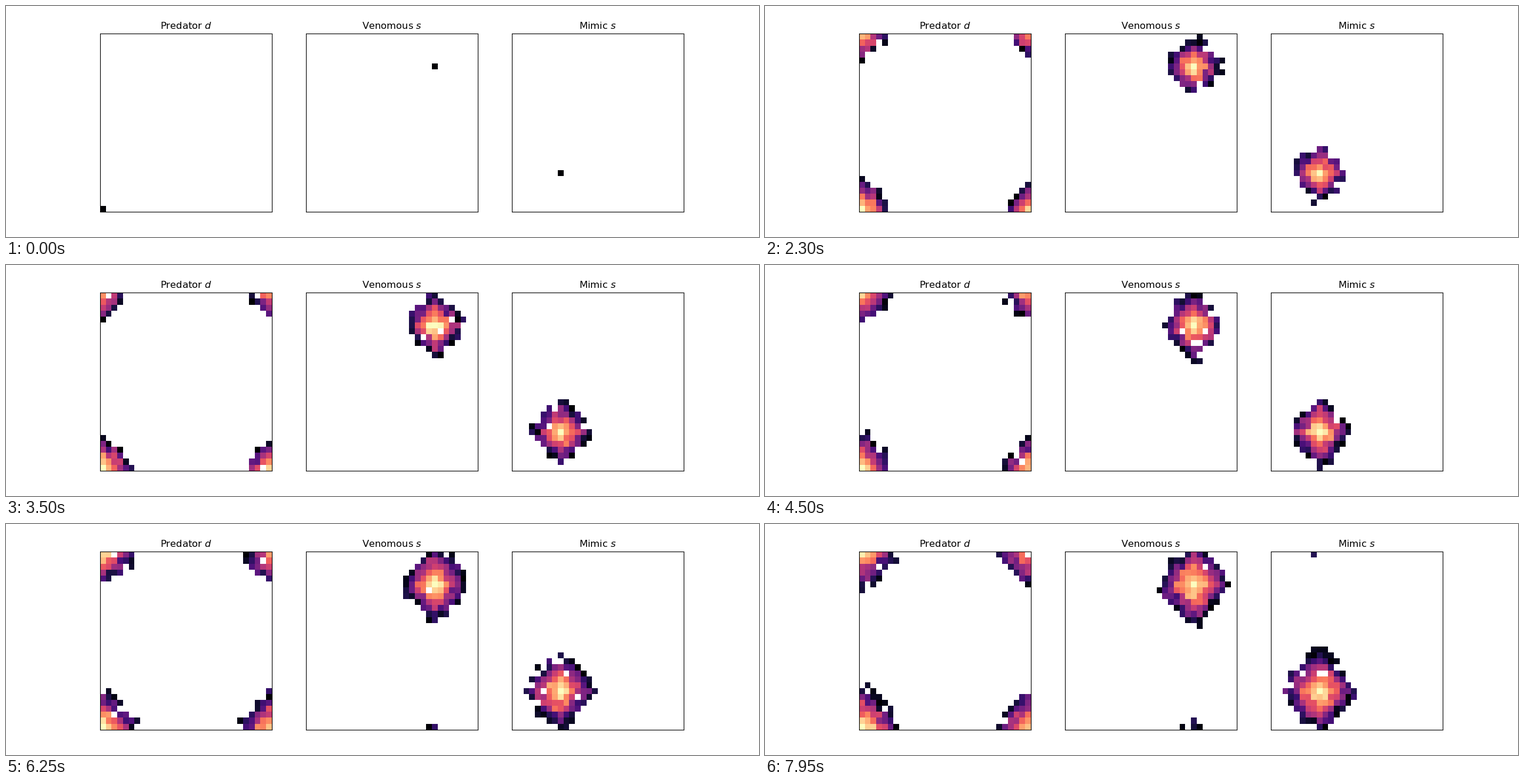
A matplotlib script that plays this animation: 1280 by 394 pixels, repeating every 8000 ms.

```python
import numpy as np
import matplotlib.pyplot as plt
from matplotlib.animation import FuncAnimation

SIZE = 30
FRAMES = 160
INTERVAL = 50
RISE = 5.0
SCALE = 1280 / 1300  # a 13 x 4 inch layout shrunk to the stage

TITLES = ["Predator $d$", "Venomous $s$", "Mimic $s$"]
CENTRES = [(0, 0), (22, 24), (8, 6)]


def make_noise(rng, keep=0.6):
    """Noise per cell that fades gradually from one step to the next."""
    noise = rng.standard_normal((FRAMES, 3, SIZE, SIZE))
    for i in range(1, FRAMES):
        noise[i] = keep * noise[i - 1] + np.sqrt(1 - keep**2) * noise[i]
    return np.clip(noise, -2.2, 2.2)


rng = np.random.default_rng(7)
NOISE = make_noise(rng)
GAPS = rng.random((FRAMES, 3, SIZE, SIZE)) < 0.03
ROWS, COLS = np.mgrid[:SIZE, :SIZE]


def wrapped(coords, centre):
    half = SIZE // 2
    return np.abs((coords - centre + half) % SIZE - half)


def density(step, panel):
    """Log abundance on the periodic grid, masked where nobody lives."""
    grow = 1 - np.exp(-step / RISE)
    reach = 0.6 + grow * (3.4 + 2.4 * step / FRAMES)
    cx, cy = CENTRES[panel]
    u = wrapped(COLS, cx) / reach
    v = wrapped(ROWS, cy) / (1.06 * reach)
    dist = (u**1.3 + v**1.3) ** (1 / 1.3)

    noise = grow * NOISE[step, panel]
    level = 1 - 0.75 * dist**1.3 + (0.03 + 0.06 * dist) * noise
    level = np.clip(level, 0, 1)
    level[cy, cx] = 1
    gap = GAPS[step, panel] & (dist > 0)
    return np.ma.masked_where(gap | (dist - 0.08 * noise > 1), level)


plt.rcParams.update({
    "font.size": 10 * SCALE,
    "axes.titlepad": 6 * SCALE,
    "axes.linewidth": 0.8 * SCALE,
})
fig, axes = plt.subplots(1, 3, figsize=(12.8, 3.94), dpi=100)
meshes = []
for panel, (ax, title) in enumerate(zip(axes, TITLES)):
    meshes.append(ax.pcolormesh(density(0, panel), cmap="magma"))
    ax.set_title(title)
    ax.set_xticks([])
    ax.set_yticks([])


def update(step):
    for panel, mesh in enumerate(meshes):
        grid = density(step, panel)
        mesh.set_array(grid)
        mesh.set_clim(grid.min(), grid.max())
    return meshes


anim = FuncAnimation(fig, update, frames=FRAMES, interval=INTERVAL, repeat=True)
plt.show()
```
